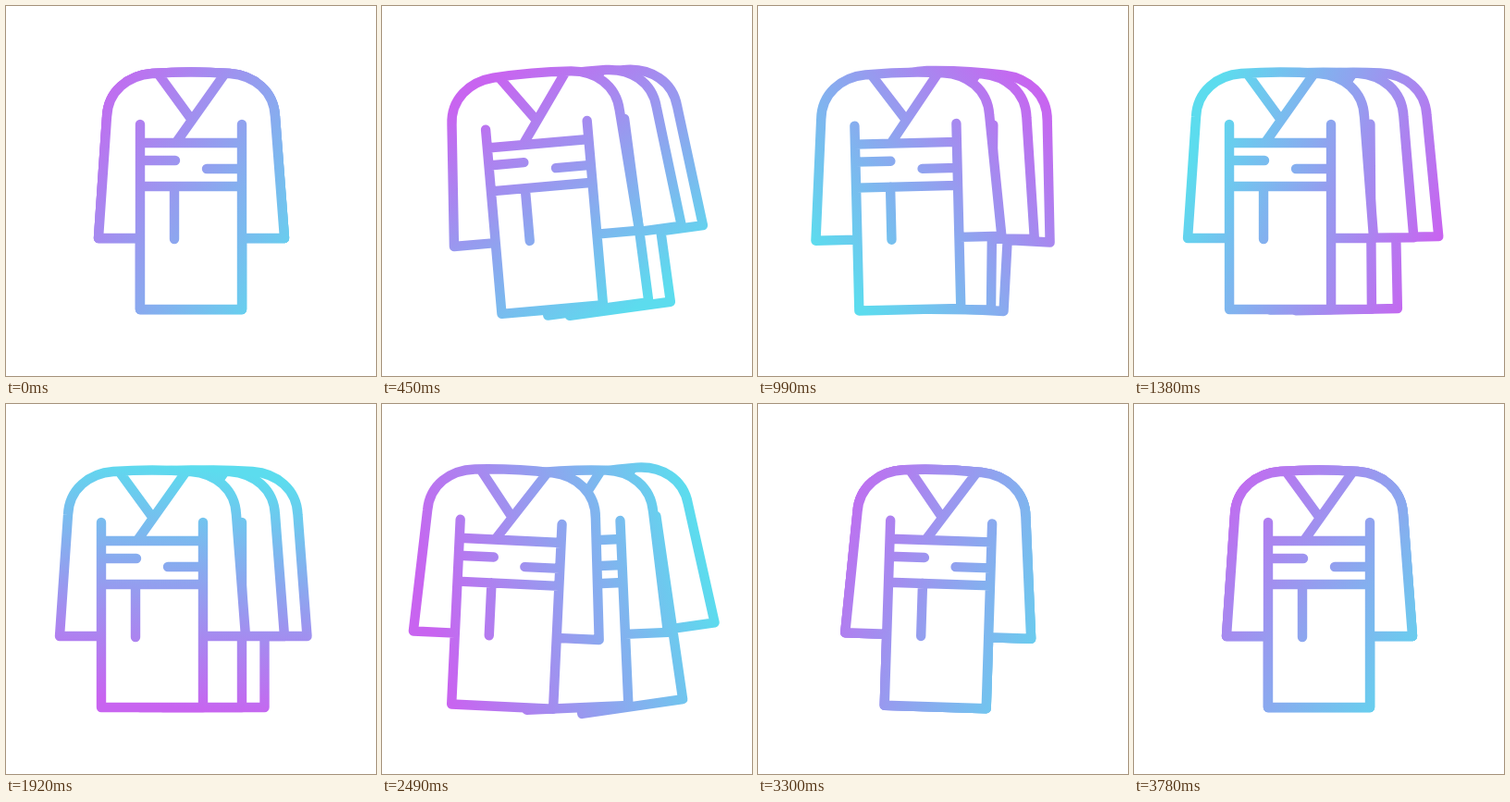
Recreate the animation shown at these times as an HTML page with a canvas. Size 400 by 400 pixels, loop 5810 ms.

```html
<!DOCTYPE html>
<html lang="en">
<head>
<meta charset="utf-8">
<title>Kimono</title>
<style>
  html, body { margin: 0; width: 100%; height: 100%; overflow: hidden; background: #fff; }
  canvas { display: block; width: 100vw; height: 100vh; }
</style>
</head>
<body>
<canvas width="400" height="400"></canvas>
<script>
const LOOP = 5810, MOVE_END = 3780, STEP = 30;
const ctx = document.querySelector('canvas').getContext('2d');
ctx.lineWidth = 10.4;
ctx.lineCap = ctx.lineJoin = 'round';

const kimono = new Path2D(
  'M145 251H100L109 120C110 92 132 75 158 73Q200 70 242 73' +
  'C268 75 290 92 291 120L301 251H255V328H145Z' +         // silhouette
  'M145 128V251M255 128V251' +                            // body sides
  'M165 74L200 122M236 74L185 146' +                      // collar
  'M145 148H255M145 195H255M145 167H183M217 176H255M182 195V252');

// Back to front: horizontal spread, swing delay, opposing swing on closing
const layers = [
  { spread: 24.5, delay: 150, counter: -12.5 },
  { spread: 0, delay: 75, counter: -6 },
  { spread: -42, delay: 0, counter: 0 }
];
const PIVOT = [212, 71];

// Keys are [time, value]
const spreadKeys = [[0, 0], [560, 1], [2000, 1], [2440, 1.42], [2870, 0]];
const openSwing = [[0, 0], [330, -8], [710, 5.3], [1070, -2.3], [1400, 0]];
const closeSwing = [[2330, 0], [2670, 6], [3070, -8.2], [3380, 3.7], [3620, -0.8], [3780, 0]];
const counterSwing = [[2250, 0], [2560, 1], [2860, 0]];
const angleKeys = [[0, 34], [450, 55], [990, 143], [1920, 278], [2490, 345], [2910, 370], [3780, 394]];
const reachKeys = [[0, 158], [450, 146], [990, 148], [1920, 130], [2490, 152], [3780, 158]];

const linear = p => p;
const smooth = p => (1 - Math.cos(Math.PI * p)) / 2;

function at(keys, t, ease = smooth) {
  if (t <= keys[0][0]) return keys[0][1];
  for (let i = 1; i < keys.length; i++) {
    const [t0, v0] = keys[i - 1], [t1, v1] = keys[i];
    if (t < t1) return v0 + (v1 - v0) * ease((t - t0) / (t1 - t0));
  }
  return keys[keys.length - 1][1];
}

function makeGradient(t) {
  const a = at(angleKeys, t, linear) * Math.PI / 180;
  const r = at(reachKeys, t, linear);
  const x = r * Math.cos(a), y = r * Math.sin(a);
  const g = ctx.createLinearGradient(200 - x, 200 - y, 200 + x, 200 + y);
  g.addColorStop(0, '#c864f0');
  g.addColorStop(1, '#5cdcee');
  return g;
}

function draw(now) {
  const t = Math.min(MOVE_END, Math.floor(now % LOOP / STEP) * STEP);
  ctx.fillStyle = '#fff';
  ctx.fillRect(0, 0, 400, 400);
  ctx.strokeStyle = makeGradient(t);

  for (const { spread, delay, counter } of layers) {
    const angle = at(openSwing, t - delay) + at(closeSwing, t) + counter * at(counterSwing, t);
    const pose = new DOMMatrix()
      .translate(PIVOT[0] + spread * at(spreadKeys, t), PIVOT[1])
      .rotate(angle)
      .translate(-PIVOT[0], -PIVOT[1]);
    const shape = new Path2D();
    shape.addPath(kimono, pose);
    ctx.fill(shape);
    ctx.stroke(shape);
  }
}

const start = performance.now();
function tick() {
  draw(performance.now() - start);
  requestAnimationFrame(tick);
}
tick();
</script>
</body>
</html>
```
